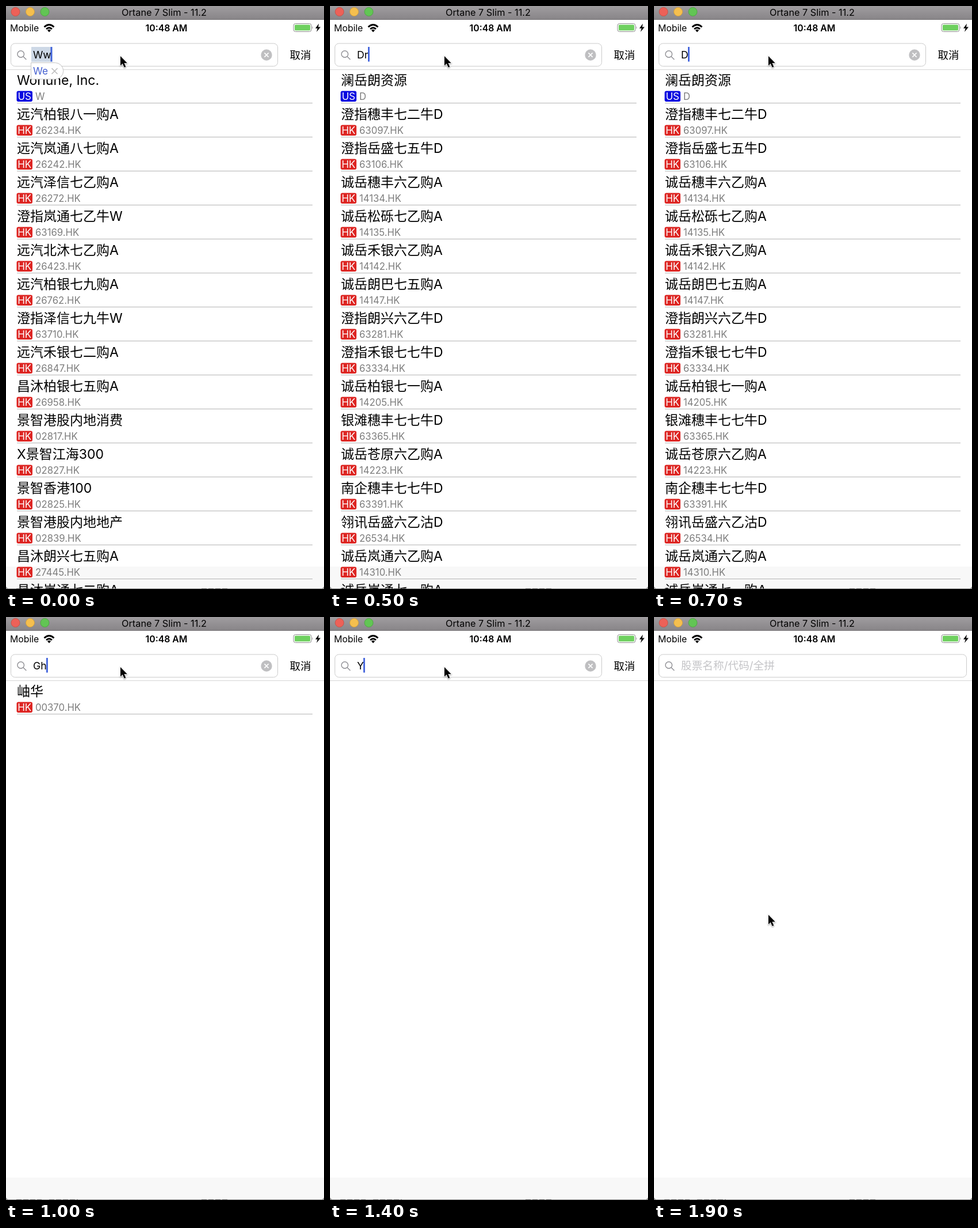
Recreate the animation shown at these times as an HTML page. Size 553 by 1012 pixels, loop 2000 ms.

```html
<!DOCTYPE html>
<html lang="zh-CN">
<head>
<meta charset="utf-8">
<title>Stock search</title>
<style>
  html, body { margin: 0; width: 100%; height: 100%; overflow: hidden; background: #fff; }
  svg { display: block; font-family: Inter, "Noto Sans CJK SC", "Noto Sans CJK", sans-serif; }
  .name { font-size: 23px; }
  .code { font-size: 16.7px; fill: #7d7d7d; }
  .badge { font-size: 17px; fill: #fff; }
  .input { font-size: 17.6px; }
  .suggest { font-size: 17.2px; fill: #4560d0; }
  .cancel { font-size: 18.5px; }
  .hint { font-size: 18.7px; fill: #c4c4c7; }
</style>
</head>
<body>
<svg width="553" height="1012" viewBox="0 0 553 1012">
  <defs>
    <linearGradient id="bar" x2="0" y2="1">
      <stop stop-color="#a09da0"/><stop offset="1" stop-color="#878487"/>
    </linearGradient>
    <clipPath id="screen">
      <path d="M0 24H553V1005Q553 1011 547 1011H6Q0 1011 0 1005Z"/>
    </clipPath>
  </defs>
  <rect width="553" height="1012" fill="#8c8c8c"/>
  <path d="M18 1011.5H62M75 1011.5H125M340 1011.5H386" stroke="#444" stroke-dasharray="9 3"/>
  <g clip-path="url(#screen)">
    <rect y="24" width="553" height="988" fill="#fff"/>
    <rect y="973" width="553" height="39" fill="#f8f8f8"/>
    <g id="list"></g>
  </g>

  <rect width="553" height="24" fill="url(#bar)"/>
  <path d="M0 23.5H553" stroke="#777477"/>
  <g stroke-width=".8">
    <circle cx="16.5" cy="10" r="7.5" fill="#ed6158" stroke="#c9493f"/>
    <circle cx="42" cy="10" r="7.5" fill="#f5bf4e" stroke="#d39d35"/>
    <circle cx="67.5" cy="10" r="7.5" fill="#62c554" stroke="#47a33b"/>
  </g>
  <text x="275" y="16.5" font-size="16.3" text-anchor="middle">Ortane 7 Slim - 11.2</text>

  <text x="7" y="44" font-size="15.8">Mobile</text>
  <g fill="none" stroke="#000" stroke-width="2.8">
    <path d="M66.5 36.5Q75 28.5 83.5 36.5M70 40Q75 35.4 80 40"/>
    <path d="M75 45.5L71.9 42Q75 39.6 78.1 42Z" fill="#000" stroke="none"/>
  </g>
  <text x="279" y="44" font-size="15.8" font-weight="600" text-anchor="middle">10:48 AM</text>
  <rect x="500" y="30.5" width="31" height="14" rx="3.5" fill="#fff" stroke="#8d8d8d"/>
  <rect x="502" y="32.5" width="27" height="10" rx="1.5" fill="#6ed05f"/>
  <path d="M532.5 35Q534.5 37.5 532.5 40Z" fill="#8d8d8d"/>
  <path d="M544 30.5L538 38.7H541.8L540 45L547 36.5H543Z"/>

  <path d="M0 110.5H553" stroke="#d6d6d6"/>
  <g id="search"></g>
  <path id="pointer" d="M0 0V16.5L3.7 13L6.6 19.6L9.4 18.4L6.5 12H11.7Z" stroke="#fff" stroke-width="1.6" paint-order="stroke"
    style="filter: drop-shadow(0 1px 1px #0006)"/>
</svg>
<script>
const $ = id => document.getElementById(id);

// Rows are "name|code"; codes are Hong Kong listings unless marked US.
const lists = {
  none: [],
  W: ["Worlune, Inc.|US W", "远汽柏银八一购A|26234", "远汽岚通八七购A|26242", "远汽泽信七乙购A|26272",
    "澄指岚通七乙牛W|63169", "远汽北沐七乙购A|26423", "远汽柏银七九购A|26762", "澄指泽信七九牛W|63710",
    "远汽禾银七二购A|26847", "昌沐柏银七五购A|26958", "景智港股内地消费|02817", "X景智江海300|02827",
    "景智香港100|02825", "景智港股内地地产|02839", "昌沐朗兴七五购A|27445", "昌沐岚通七二购A|27450"],
  D: ["澜岳朗资源|US D", "澄指穗丰七二牛D|63097", "澄指岳盛七五牛D|63106", "诚岳穗丰六乙购A|14134",
    "诚岳松砾七乙购A|14135", "诚岳禾银六乙购A|14142", "诚岳朗巴七五购A|14147", "澄指朗兴六乙牛D|63281",
    "澄指禾银七七牛D|63334", "诚岳柏银七一购A|14205", "银滩穗丰七七牛D|63365", "诚岳苍原六乙购A|14223",
    "南企穗丰七七牛D|63391", "翎讯岳盛六乙沽D|26534", "诚岳岚通六乙购A|14310", "诚岳岚通七一购A|14312"],
  G: ["岫华|00370"],
  Y: ["云禾岁月|US YY"]
};

// Each step holds from its start time (ms) until the next one.
const steps = [
  { at: 0, text: "Ww", list: "W", caret: 79, suggest: "We", close: 84.5 },
  { at: 200, text: "W", list: "W", caret: 66 },
  { at: 300, text: "", list: "none", caret: 48 },
  { at: 400, text: "D", list: "D", caret: 60.5 },
  { at: 500, text: "Dr", list: "D", caret: 67.5 },
  { at: 600, text: "D", list: "D", caret: 60.5 },
  { at: 800, text: "", list: "none", caret: 48 },
  { at: 900, text: "Gh", list: "G", caret: 71.5 },
  { at: 1200, text: "", list: "none", caret: 48 },
  { at: 1400, text: "Y", list: "none", caret: 59.5 },
  { at: 1500, text: "Yy", list: "Y", caret: 68.5, suggest: "Yay", close: 87 },
  { at: 1700, text: "", list: "none", caret: 48 },
  { at: 1800, text: "", list: "none", idle: true }
];

const cross = (x, y, r, color) =>
  `<path d="M${x - r} ${y - r}l${2 * r} ${2 * r}m0 ${-2 * r}l${-2 * r} ${2 * r}" stroke="${color}" stroke-width="1.6"/>`;

function row(item, i) {
  const [name, listing] = item.split("|");
  const us = listing.startsWith("US");
  return `<g transform="translate(0 ${i * 59})">
    <text class="name" x="19" y="137">${name}</text>
    <rect x="18.5" y="147.5" width="27.5" height="18.5" rx="3" fill="${us ? "#0606e0" : "#dd2623"}"/>
    <text class="badge" x="32.2" y="162.8" text-anchor="middle">${us ? "US" : "HK"}</text>
    <text class="code" x="51" y="162.5">${us ? listing.slice(3) : listing + ".HK"}</text>
    <path d="M19 168.5H533" stroke="#b4b4b4"/>
  </g>`;
}

function searchBar({ text, caret, suggest, close, idle }) {
  let out = `<rect x="8.5" y="65" width="${idle ? 535 : 464}" height="39.5" rx="7" fill="#fff" stroke="#cbcbcb"/>
    <g fill="none" stroke="#8e8e93" stroke-width="1.4">
      <circle cx="25.7" cy="83.5" r="5.8"/><path d="M30 87.8L35.3 93"/>
    </g>`;
  if (suggest) out += `<rect x="44" y="71" width="${caret - 42}" height="26" fill="#cdd8e6"/>`;
  out += text ? `<text class="input" x="47" y="90.5">${text}</text>
      <circle cx="453" cy="85" r="9.7" fill="#bfbfc1"/>${cross(453, 85, 3.6, "#fff")}`
    : `<text class="hint" x="47" y="91">股票名称/代码/全拼</text>`;
  if (!idle) out += `<rect x="${caret - 1.5}" y="71" width="2.8" height="25.5" fill="#4163dc"/>
    <text class="cancel" x="493.5" y="92">取消</text>`;
  if (suggest) {
    out += `<path d="M43.5 98.5H${close + 1}a14.25 14.25 0 0 1 0 28.5H43.5Z" fill="#fff" stroke="#c3c3c3"/>
      <text class="suggest" x="47" y="119.2">${suggest}</text>${cross(close, 113, 5, "#bcbcbc")}`;
  }
  return out;
}

let shown;
function draw(time) {
  const step = steps.findLast(s => s.at <= time);
  if (step === shown) return;
  shown = step;
  $("list").innerHTML = lists[step.list].map(row).join("");
  $("search").innerHTML = searchBar(step);
  $("pointer").setAttribute("transform", `translate(199 ${step.idle ? 517 : 87})`);
}

const start = performance.now();
function tick() {
  draw((performance.now() - start) % 2000);
  requestAnimationFrame(tick);
}
tick();
</script>
</body>
</html>
```
